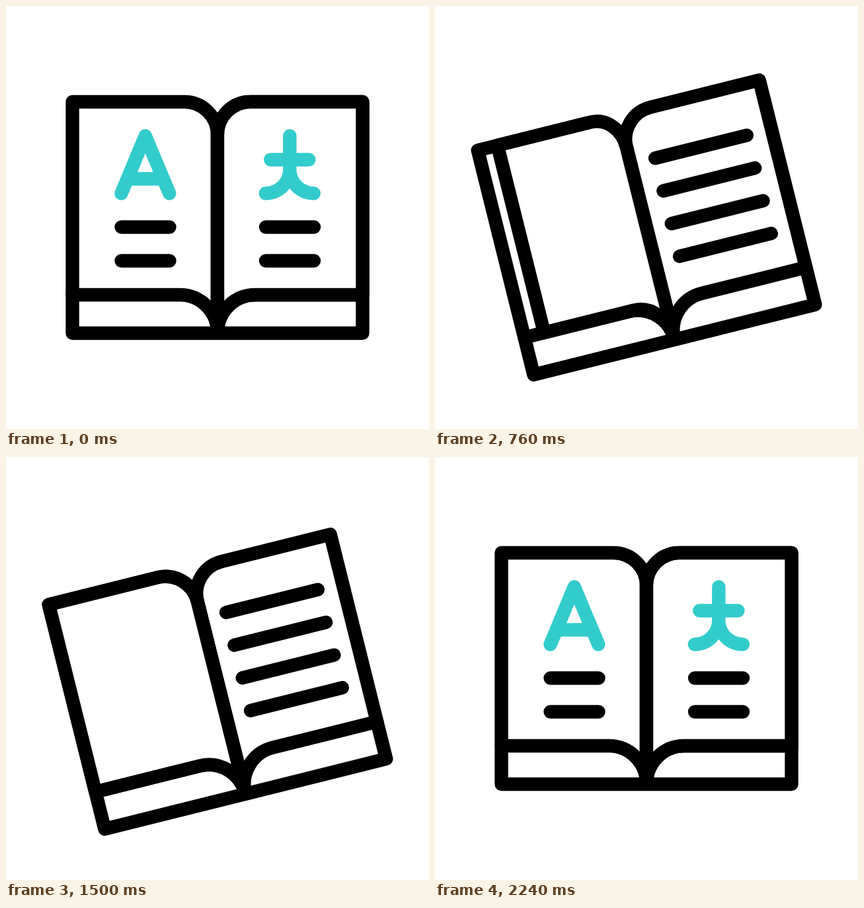
These frames come from a looping animation (640 px wide and 640 px high, 2400 ms). An HTML page:

```html
<!DOCTYPE html>
<html lang="en">
<head>
<meta charset="utf-8">
<title>Dictionary</title>
<style>
  html, body { margin: 0; width: 100%; height: 100%; overflow: hidden; background: #fff; }
  svg { display: block; width: 100%; height: 100%; }
  path { fill: none; stroke: #000; stroke-width: 20.4; stroke-linecap: round; stroke-linejoin: round; vector-effect: non-scaling-stroke; }
  .sheet { fill: #fff; }
  .paper { fill: #fff; stroke: none; }
  .accent { stroke: #33cccc; }
</style>
</head>
<body>
<svg viewBox="0 0 640 640">
  <defs>
    <!-- One page, measured from the spine outwards -->
    <path id="page" d="M0 195A50 50 0 0 1 50 145H219.5V437H57A57 57 0 0 0 0 494Z"/>
  </defs>
  <g id="book">
    <g transform="translate(320 0)">
      <path class="sheet" d="M-219.5 437V495H219.5V437"/>
      <g transform="scale(-1 1)"><path class="sheet" d="M0 195A50 50 0 0 1 50 145H219.5V437H57A57 57 0 0 0 0 494Z"/></g>
      <path class="sheet" d="M0 195A50 50 0 0 1 50 145H219.5V437H57A57 57 0 0 0 0 494Z"/>
      <path class="accent" d="M-145.5 283.5L-109.3 196.5L-72.8 283.5M-136 261.5H-83"/>
      <path d="M-145.5 334.5h73M-145.5 385.5h73"/>
      <path d="M38 221.5h143M38 272.5h143M38 323.5h143M38 374.5h143"/>
      <g id="turning">
        <path class="paper outline"/>
        <g id="print">
          <path class="accent" d="M109.3 196.5V247A36.5 36.5 0 0 1 72.8 283.5M109.3 247A36.5 36.5 0 0 0 145.8 283.5M80.2 232.5H138.4"/>
          <path d="M73 334.5h73M73 385.5h73"/>
        </g>
        <path class="outline"/>
      </g>
    </g>
  </g>
</svg>
<script>
const LOOP = 2400, STEP = 20;
const book = document.getElementById('book');
const turning = document.getElementById('turning');
const print = document.getElementById('print');
const pageShape = document.getElementById('page').getAttribute('d');
document.querySelectorAll('.outline').forEach(p => p.setAttribute('d', pageShape));

const progress = (t, from, to) => Math.min(1, Math.max(0, (t - from) / (to - from)));
const ease = p => p * p * (3 - 2 * p);

function draw(time) {
  const frame = Math.floor((time % LOOP) / STEP) * STEP;
  const t = Math.min(frame, LOOP - frame); // plays forward, then back
  const angle = -14 * ease(progress(t, 200, 700));
  const drop = 25.5 * ease(progress(t, 200, 1200));
  const turn = 1 - 2 * progress(t, 202, 802);
  const width = Math.abs(turn) < 0.002 ? 0.002 : turn;

  book.setAttribute('transform', `translate(0 ${drop}) rotate(${angle} 320 320)`);
  turning.setAttribute('transform', `scale(${width} 1)`);
  print.setAttribute('visibility', turn > 0 ? 'visible' : 'hidden');
}

const start = performance.now();
function tick() {
  draw(performance.now() - start);
  requestAnimationFrame(tick);
}
tick();
</script>
</body>
</html>
```
